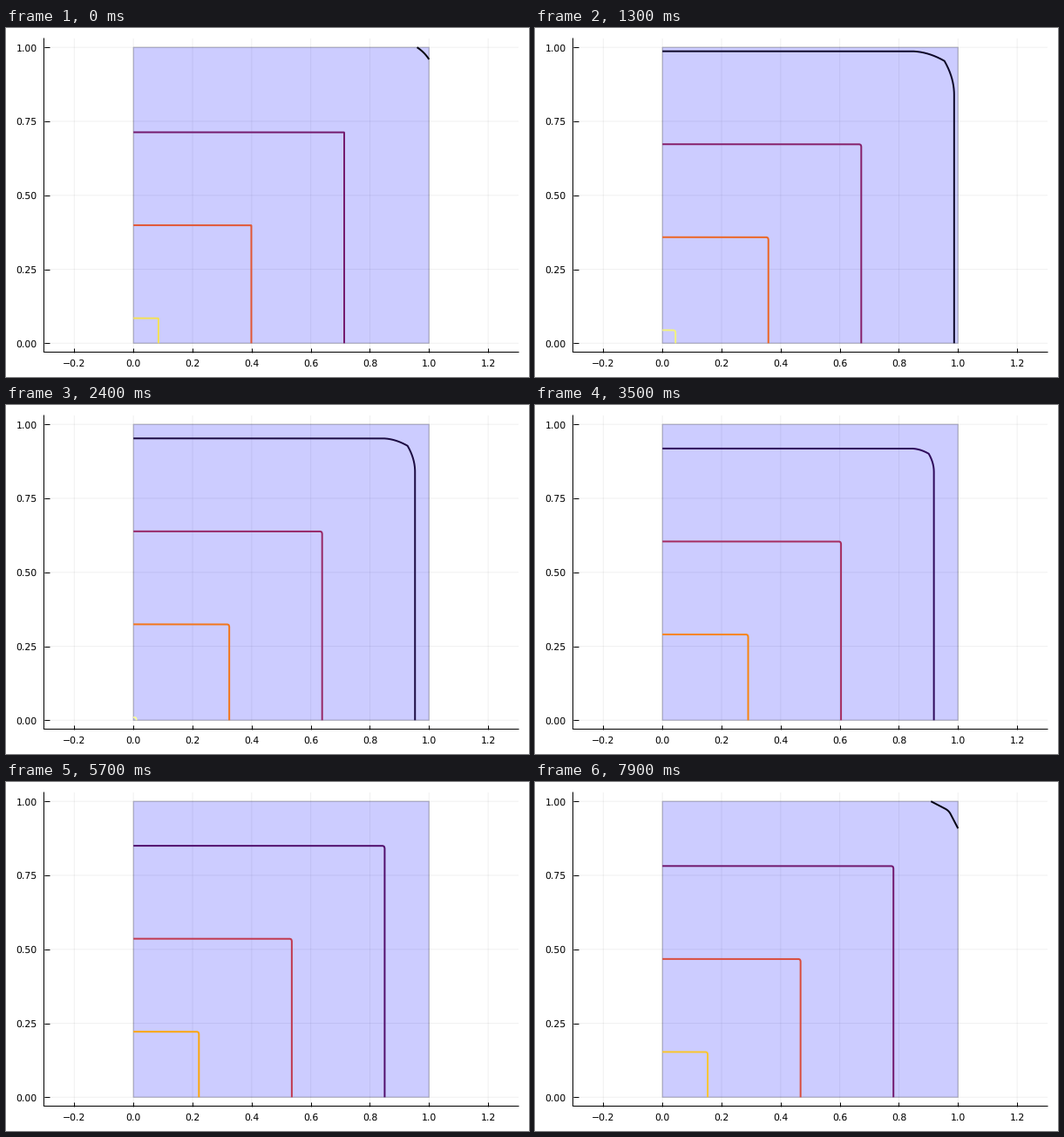
A matplotlib script for the animation above (8 s loop, 600 by 400 pixels).

```python
import numpy as np
import matplotlib.pyplot as plt
from matplotlib.animation import FuncAnimation
from matplotlib.patches import Rectangle

W, H, DPI = 600, 400, 100
FRAMES, INTERVAL = 80, 100
PX = 72 / DPI                 # one pixel in points
SPACING = np.pi / 10          # distance between fronts
STEP = SPACING / 101          # inward shift per frame
START = 1.0272                # outermost front at time zero
BEND = 0.84                   # fronts are rounded beyond this point
POWER, FLATNESS = 2.5, 2.7    # early and late corner shape
ENTRY, SLOPE = 65, 0.52       # late front entering at the corner

plt.rcParams.update({"font.family": "DejaVu Sans", "path.snap": False,
                     "text.hinting": "none"})
fig = plt.figure(figsize=(W / DPI, H / DPI), dpi=DPI, facecolor="white")
left, right, top, bottom = 43.5, 588, 12, 371.5
ax = fig.add_axes([left / W, 1 - bottom / H, (right - left) / W, (bottom - top) / H])
half = (right - left) / (bottom - top) * 1.06 / 2
ax.set_xlim(0.5 - half, 0.5 + half)
ax.set_ylim(-0.03, 1.03)
ax.patch.set_visible(False)

ax.spines[["top", "right"]].set_visible(False)
for side in ("left", "bottom"):
    ax.spines[side].set_linewidth(PX)
xticks = np.arange(-1, 7) * 0.2
yticks = np.arange(5) * 0.25
ax.set_xticks(xticks, [f"{v:.1f}".replace("-", "\u2212") for v in xticks])
ax.set_yticks(yticks, [f"{v:.2f}" for v in yticks])
ax.tick_params(direction="in", length=5.5 * PX, width=PX, pad=7.7 * PX,
               labelsize=10.9 * PX)
ax.set_axisbelow(True)
ax.grid(color="black", alpha=0.06, linewidth=PX)

ax.add_patch(Rectangle((0, 0), 1, 1, facecolor=(0, 0, 1, 0.2),
                       edgecolor=(0, 0, 0, 0.2), linewidth=1.4 * PX, zorder=1.5))

cmap = plt.get_cmap("inferno")
fronts = [ax.plot([], [], lw=2 * PX, solid_capstyle="butt",
                  solid_joinstyle="round", zorder=3)[0] for _ in range(5)]

# Upper half of a unit corner, up to the diagonal
s = np.linspace(0, 1, 121)
u = s * 0.5 ** (1 / POWER)
ROUND = np.array([u, (1 - u ** POWER) ** (1 / POWER)])
u = s * (np.sqrt(1 + 4 / FLATNESS) - 1) * FLATNESS / 2
KINKED = np.array([u, 1 - u ** 2 / FLATNESS])


def rounded_front(level, frame):
    """Square front with a corner that sharpens on the diagonal."""
    age = min(1, frame / 13)
    r = min(level, max(level - BEND, 0.002 + 0.007 * age))
    u, v = level - r + r * (ROUND + age * (KINKED - ROUND))
    x = np.r_[0, u, v[::-1], level]
    y = np.r_[level, v, u[::-1], 0]
    keep = (x <= 1) & (y <= 1)
    return x[keep], y[keep]


def corner_front(frame):
    """Bent front that comes in from the upper right corner."""
    if frame < ENTRY:
        return [], []
    k = 1 + SLOPE - 0.0034 * (frame - ENTRY)
    tip = k / (1 + SLOPE)
    edge = (k - 1) / SLOPE
    a = tip + 0.2 * (np.array([edge, 1]) - tip)
    t = np.linspace(0, 1, 9)[:, None]
    curve = (1 - t) ** 2 * a + 2 * t * (1 - t) * tip + t ** 2 * a[::-1]
    pts = np.vstack([[edge, 1], curve, [1, edge]])
    return pts[:, 0], pts[:, 1]


def update(frame):
    peak = 1.051 + 0.0011 * frame
    for k, line in enumerate(fronts, start=-1):
        level = START - k * SPACING - frame * STEP
        if k < 0:
            line.set_data(*corner_front(frame))
        elif level > 0:
            line.set_data(*rounded_front(level, frame))
        else:
            line.set_data([], [])
        line.set_color(cmap(float(np.clip(1 - level / peak, 0, 1))))
    return fronts


anim = FuncAnimation(fig, update, frames=FRAMES, interval=INTERVAL,
                     repeat=True, repeat_delay=0, blit=False)
plt.show()
```
